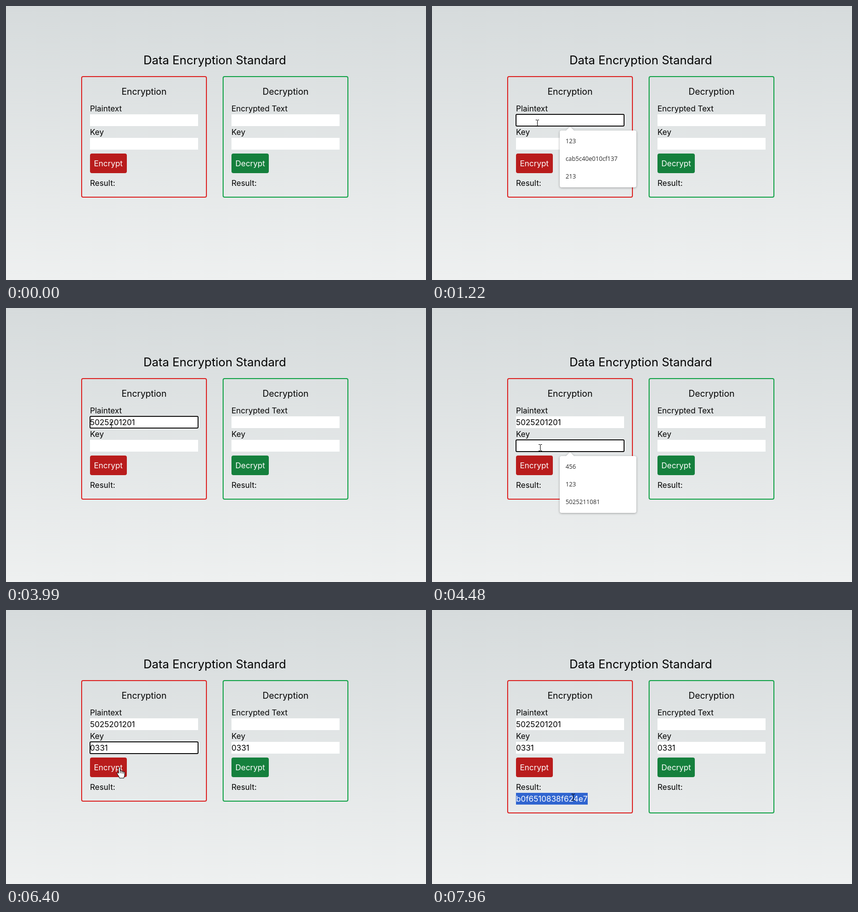
An HTML page that plays this animation: 855 px wide and 559 px high, repeating every 8 s.

```html
<!DOCTYPE html>
<html lang="en">
<head>
<meta charset="utf-8">
<title>Data Encryption Standard</title>
<style>
  * { box-sizing: border-box; }
  html, body { margin: 0; width: 100%; height: 100%; overflow: hidden; }
  body {
    position: relative; color: #000;
    font: 16px/24px Inter, sans-serif;
    background: linear-gradient(#d6dbdc, #eef0f0);
  }
  h1, h2 { margin: 0; font-weight: 400; text-align: center; }
  h1 { position: absolute; left: 153px; top: 95px; width: 544px; font-size: 24px; line-height: 32px; }
  h2 { font-size: 18px; line-height: 28px; margin-bottom: 8px; }
  .card {
    position: absolute; top: 143px; width: 256px; height: 248px;
    padding: 16px; border: 2px solid; border-radius: 4px;
  }
  .card > * { color: #000; }
  #encryption { left: 153px; border-color: #dc2626; }
  #decryption { left: 441px; border-color: #16a34a; }
  .field { position: relative; height: 24px; background: #fff; white-space: pre; }
  .field.focus::after {
    content: ""; position: absolute; inset: -1px;
    border: 2px solid #101010; border-radius: 3px; box-shadow: 0 0 0 1px #fffc;
  }
  .caret { display: inline-block; width: 1px; height: 20px; margin-right: -1px; vertical-align: -5px; background: #000; }
  .button { width: fit-content; margin: 8px 0; padding: 8px; border-radius: 4px; color: #fff; }
  #encryption .button { background: #b91c1c; }
  #decryption .button { background: #15803d; }
  .result { width: fit-content; }
  .result.selected { background: #3065d0; color: #fff; }
  .popup {
    position: absolute; left: 260px; width: 156px; height: 116px; padding: 4px 12px;
    background: #fff; border-radius: 4px; filter: drop-shadow(0 1px 2px #0005);
    font: 12.25px/36px "Open Sans", sans-serif; color: #2b2b2b;
  }
  .popup::before {
    content: ""; position: absolute; left: 13px; top: -8px;
    border: solid transparent; border-width: 0 8px 8px; border-bottom-color: #fff;
  }
  svg { position: absolute; left: 0; top: 0; overflow: visible; }
  svg path { fill: #fff; stroke: #000; stroke-linejoin: round; }
  svg #ibeam { fill: none; shape-rendering: crispEdges; }
</style>
</head>
<body>
<h1>Data Encryption Standard</h1>
<div class="card" id="encryption">
  <h2>Encryption</h2>
  <div>Plaintext</div><div class="field" id="plain"></div>
  <div>Key</div><div class="field" id="key"></div>
  <div class="button">Encrypt</div>
  <div>Result:</div><div class="result" id="result"></div>
</div>
<div class="card" id="decryption">
  <h2>Decryption</h2>
  <div>Encrypted Text</div><div class="field"></div>
  <div>Key</div><div class="field" id="keyCopy"></div>
  <div class="button">Decrypt</div>
  <div>Result:</div>
</div>
<div class="popup" id="plainPopup" style="top:254px"><div>123</div><div>cab5c40e010cf137</div><div>213</div></div>
<div class="popup" id="keyPopup" style="top:302px"><div>456</div><div>123</div><div>5025211081</div></div>
<svg id="pointer" width="1" height="1">
  <path id="arrow" d="M0 0V16L4 12.5L6.5 18.5L9 17.5L6.5 11.5H11.5Z"/>
  <path id="ibeam" d="M-3-6.5h3m1 0h3M.5-6v12M-3 6.5h3m1 0h3"/>
  <path id="hand" d="M-1.7 1.5C-1.7-.7 1.7-.7 1.7 1.5V8C1.7 6.3 5 6.4 5 8.3V9C5 7.4 8 7.5 8 9.3V10.2C8 8.8 10.7 9 10.7 10.7V15C10.7 18 9 19 9 22H0C0 19-4.5 14.5-4.7 12.3C-4.8 10.5-2.8 10.6-1.7 12.3ZM1.7 8V12M5 9V12.5M8 10.2V13"/>
</svg>
<script>
const LOOP = 8000;
const $ = id => document.getElementById(id);

const plain = { text: "5025201201", times: [1820, 1980, 2140, 2220, 2550, 2720, 2890, 3140, 3310, 3490], focus: [960, 4240] };
const key = { text: "0331", times: [5140, 5470, 5650, 5740], focus: [4240, 6570] };

// Pointer moves: first step, last step, number of steps, destination.
const moves = [
  [230, 790, 8, 214, 239],
  [4160, 4400, 4, 220, 285],
  [5560, 5740, 2, 227, 285],
  [5910, 6400, 7, 231, 321],
  [7060, 7540, 7, 276, 384],
  [7710, 7790, 2, 271, 376],
  [7960, 7960, 1, 287, 382]
];

const between = (t, [from, to]) => t >= from && t < to;
const passed = (times, t) => times.filter(time => time <= t).length;
const fade = (times, t) => passed(times, t) / times.length;

function pointerAt(t) {
  let x = 278, y = 590;
  for (const [start, end, steps, toX, toY] of moves) {
    if (t < start) break;
    const interval = (end - start) / (steps - 1 || 1) || 1;
    const k = Math.min(steps, Math.floor((t - start) / interval + 1.001)) / steps;
    x += (toX - x) * k;
    y += (toY - y) * k;
  }
  return [Math.round(x), Math.round(y)];
}

function pointerShape(x, y) {
  if (x < 246 && between(y, [301, 341])) return "hand";
  const overText = [[221, 245], [269, 293], [373, 397]].some(rows => between(y, rows));
  return overText ? "ibeam" : "arrow";
}

function drawField(element, { text, times, focus }, t) {
  const count = passed(times, t);
  const focused = between(t, focus);
  const sinceKey = t - times[count - 1];
  element.textContent = text.slice(0, count);
  element.classList.toggle("focus", focused);
  if (focused && count && sinceKey % 1000 < 500) {
    element.insertAdjacentHTML("beforeend", '<span class="caret"></span>');
  }
}

function draw(t) {
  drawField($("plain"), plain, t);
  drawField($("key"), key, t);
  $("keyCopy").textContent = key.text.slice(0, passed(key.times, t));

  $("plainPopup").style.opacity = fade([1040, 1130, 1220], t) - fade([1820, 1900, 1980], t);
  $("keyPopup").style.opacity = fade([4320, 4400, 4480], t) - fade([5140, 5220, 5300], t);

  const done = t >= 6650;
  $("result").textContent = done ? "b0f6510838f624e7" : "";
  $("result").classList.toggle("selected", t >= 7710);
  for (const id of ["encryption", "decryption"]) $(id).style.height = done ? "272px" : "248px";

  const [x, y] = pointerAt(t);
  const shape = pointerShape(x, y);
  $("pointer").style.transform = `translate(${x}px, ${y}px)`;
  for (const id of ["arrow", "ibeam", "hand"]) $(id).style.display = id === shape ? "" : "none";
}

const begin = performance.now();
function tick() {
  draw((performance.now() - begin) % LOOP);
  requestAnimationFrame(tick);
}
tick();
</script>
</body>
</html>
```
